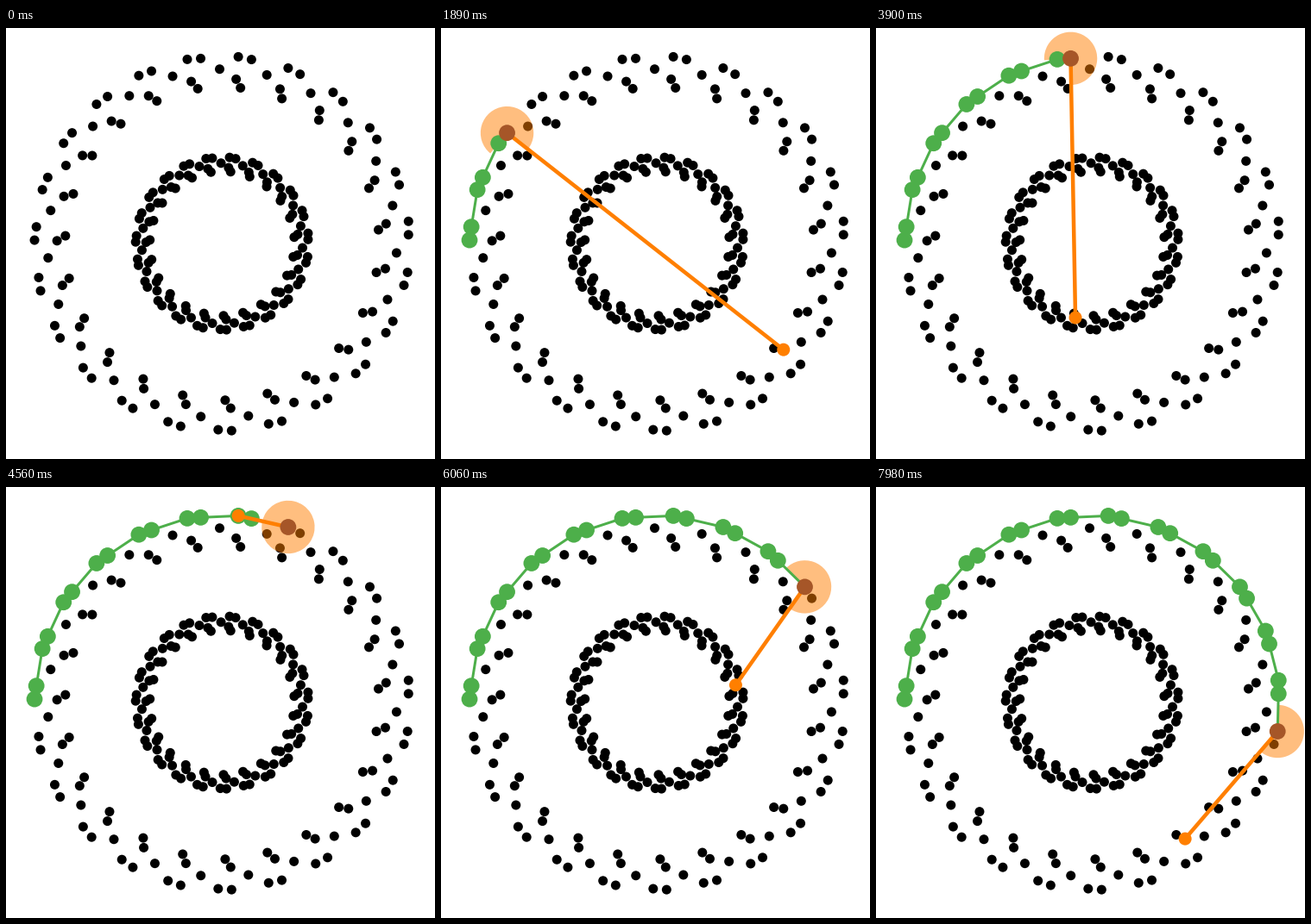
Recreate the animation shown at these times as a matplotlib script. Size 497 by 500 pixels, loop 8 s.

```python
import numpy as np
import matplotlib.pyplot as plt
from matplotlib.animation import FuncAnimation
from matplotlib.collections import PatchCollection
from matplotlib.patches import Circle, Wedge

W, H, DPI = 497, 500, 128
PT = 72 / DPI
CENTER = np.array([250.4, 250.0])
SECTORS = 23
SCALES = (1, 0.461)
ORANGE, GREEN, BROWN = "#ff7f00", "#4daf4a", "#a65628"

# Radius and angle of the five points that repeat in every sector
MOTIF = {
    "A": (217.4, 178.97),
    "B": (216.1, 174.87),
    "C": (202.3, 169.08),
    "D": (191.3, 179.05),
    "E": (181.8, 177.19),
}

# Points tested from each hull corner: ring, sector, motif
CANDIDATES = [
    (0, 6, "A"), (0, 19, "D"), (1, 3, "A"), (0, 0, "B"),
    (0, 15, "D"), (0, 10, "C"), (1, 10, "C"), (1, 21, "E"),
    (1, 7, "B"), (0, 14, "D"), (1, 18, "D"),
]
CORNERS = [(0, i // 2, "AB"[i % 2]) for i in range(25)]

FRAMES, INTERVAL, STEP_MS = 400, 20, 30


def place(key):
    ring, sector, kind = key
    radius, angle = MOTIF[kind]
    a = np.radians(angle - sector * 360 / SECTORS)
    return CENTER + SCALES[ring] * radius * np.array([np.cos(a), np.sin(a)])


def bearing(start, end):
    dx, dy = end - start
    return np.degrees(np.arctan2(dy, dx))


hull = [place(c) for c in CORNERS]
schedule = [(i, place(c)) for i, corner in enumerate(CORNERS)
            for c in CANDIDATES if c != corner]

fig = plt.figure(figsize=(W / DPI, H / DPI), dpi=DPI, facecolor="white")
ax = fig.add_axes([0, 0, 1, 1])
ax.set_xlim(0, W)
ax.set_ylim(0, H)
ax.axis("off")

dots = [Circle(place((r, s, m)), 5.5)
        for r in range(2) for s in range(SECTORS) for m in MOTIF]
ax.add_collection(PatchCollection(dots, facecolor="black", linewidth=0, zorder=1))

wedge = ax.add_patch(Wedge((0, 0), 30.7, 0, 360, facecolor=ORANGE,
                           alpha=0.5, linewidth=0, zorder=2))
path, = ax.plot([], [], color=GREEN, lw=3 * PT, zorder=3)
corners = [ax.add_patch(Circle(p, 9.4, facecolor=GREEN, linewidth=0, zorder=4))
           for p in hull]
ray, = ax.plot([], [], color=ORANGE, lw=4.5 * PT, zorder=5)
pivot = ax.add_patch(Circle((0, 0), 9.4, facecolor=BROWN, linewidth=0, zorder=6))
probe = ax.add_patch(Circle((0, 0), 7.5, facecolor=ORANGE, linewidth=0, zorder=7))


def update(frame):
    step = (frame * INTERVAL + INTERVAL // 2) // STEP_MS
    active = step > 0
    index, target = schedule[step]
    here = hull[index]

    for artist in (path, ray, pivot, probe):
        artist.set_visible(active)
    for i, corner in enumerate(corners):
        corner.set_visible(active and i < index)
    path.set_data(*np.transpose(hull[:index + 1]))
    ray.set_data(*np.transpose([here, target]))
    pivot.center = here
    probe.center = target

    # The wedge runs from the ray round the outside to the last edge
    wedge.set_visible(index > 0)
    if index > 0:
        start = bearing(here, target)
        inner = (bearing(here, hull[index - 1]) - start) % 360
        wedge.set_center(here)
        wedge.set_theta1(start)
        wedge.set_theta2(start + (inner if inner > 1e-6 else 360))
    return [wedge, path, ray, pivot, probe, *corners]


anim = FuncAnimation(fig, update, frames=FRAMES, interval=INTERVAL,
                     repeat=True, repeat_delay=0, blit=False)
plt.show()
```
